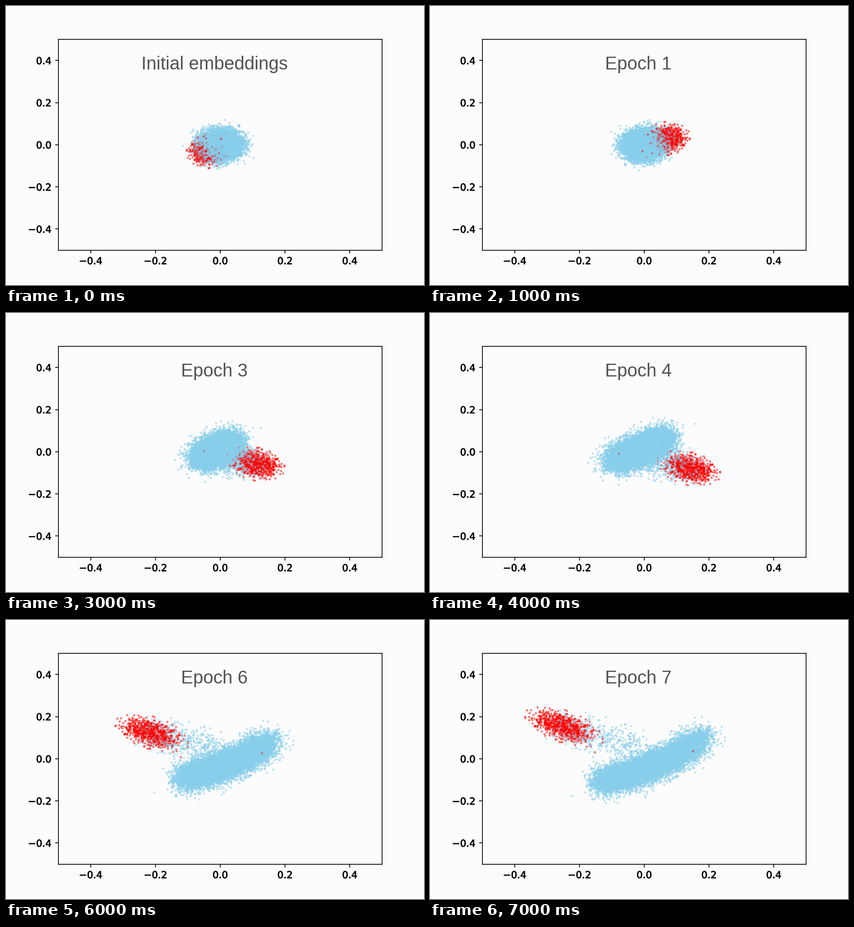
These frames come from a looping animation (917x611 px, 8 s). A matplotlib script:

```python
import numpy as np
import matplotlib.pyplot as plt
from matplotlib.animation import FuncAnimation
from matplotlib.colors import to_rgba
from matplotlib.patheffects import withStroke

W, H, DPI = 917, 611, 152.8
BG = "#fcfcfc"
UNIT = np.array([710.7, 461.3])  # pixels per data unit
N_BLUE, N_TAIL, N_RED = 11000, 420, 760

# Cluster shape per epoch, in pixels from the plot centre
SPREAD = [0, 0, 15, 32, 55, 75, 92, 108]
RISE = [0, 0, 9, 18, 25, 32, 38, 45]
RED_X = [-27, -48, -63, -78, -98, -120, -150, -176]
RED_Y = [15, 14, 20, 27, 37, 47, 57, 71]
# The projection axes may change sign between epochs
FLIP = [(1, -1), (-1, 1), (-1, -1), (-1, -1), (-1, -1), (1, 1), (1, 1), (1, 1)]

rng = np.random.default_rng(7)
along = 1.25 * np.tanh(0.55 * rng.standard_normal(N_BLUE))
blue_noise = rng.standard_normal((N_BLUE, 2))
tail_t = rng.uniform(-0.1, 0.95, N_TAIL)[:, None]
tail_noise = rng.standard_normal((N_TAIL, 2))
red_noise = np.clip(rng.standard_normal((N_RED, 2)), -2.9, 2.9)
order = rng.permutation(N_BLUE + N_TAIL + N_RED)

colors = np.array([to_rgba("skyblue", 0.4)] * (N_BLUE + N_TAIL)
                  + [to_rgba("red", 0.4)] * N_RED)

# One red stray sits inside the blue cloud
stray = order[order < N_BLUE][-250]
along[stray], blue_noise[stray] = 0.85, (0, -0.9)
colors[stray] = to_rgba("red", 0.4)


def positions(k):
    """Data coordinates of all points at epoch k."""
    late = max(0, k - 4)
    blue = np.column_stack([
        2 + 1.9 * k + SPREAD[k] * along,
        -k - 3.5 * late + RISE[k] * along + 4.5 * late * along ** 2,
    ]) + blue_noise * (20 - 0.75 * k, 14 + 0.2 * k)

    centre = np.array([RED_X[k], RED_Y[k]])
    dx = (16 + 1.9 * k) * red_noise[:, 0]
    dy = 14 * red_noise[:, 1] - 0.038 * k * dx
    red = centre + np.column_stack([dx, dy])

    tail = centre + tail_t * ((0, 20) - centre)
    tail = tail + tail_noise * (14 + k, 14 + 0.5 * k)

    points = np.vstack([blue, tail, red]) * FLIP[k] / UNIT
    return points[order]


fig = plt.figure(figsize=((W + 0.01) / DPI, (H + 0.01) / DPI), dpi=DPI, facecolor=BG)
ax = fig.add_axes([0.125, 0.125, 0.775, 0.755], facecolor=BG)
ax.set(xlim=(-0.5, 0.5), ylim=(-0.5, 0.5))
ticks = [-0.4, -0.2, 0, 0.2, 0.4]
ax.set_xticks(ticks)
ax.set_yticks(ticks)
for label in ax.get_xticklabels() + ax.get_yticklabels():
    label.set_path_effects([withStroke(linewidth=0.4, foreground="black")])

dots = ax.scatter(*positions(0).T, s=2, linewidths=1, c=colors[order])
title = fig.text(0.499, (H - 139) / H, "", ha="center", va="baseline",
                 family="Liberation Sans", size=18.8, color="#525254")


def update(k):
    dots.set_offsets(positions(k))
    title.set_text(f"Epoch {k}" if k else "Initial embeddings")
    return dots, title


anim = FuncAnimation(fig, update, frames=8, interval=1000, repeat=True, repeat_delay=0)
plt.show()
```
